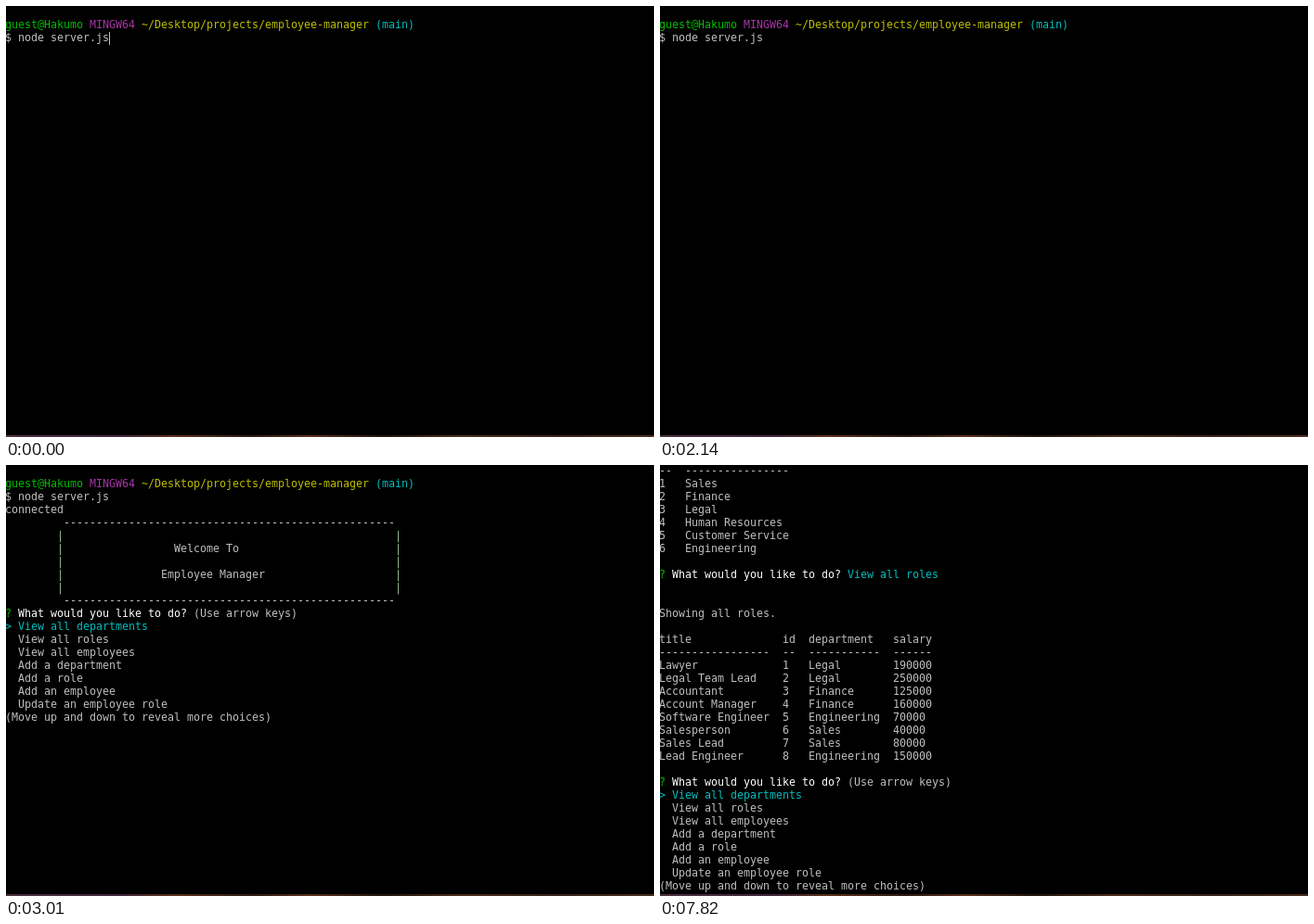
An HTML page that plays this animation: 698x465 px, repeating every 8000 ms.

```html
<!DOCTYPE html>
<html lang="en">
<head>
<meta charset="utf-8">
<title>Terminal session</title>
<style>
  html, body { margin: 0; width: 100%; height: 100%; overflow: hidden; background: #000; }
  #stage { position: relative; width: 698px; height: 465px; overflow: hidden; }
  #screen {
    position: absolute; left: -1px; top: -1px; margin: 0;
    font: 11.63px/14px "DejaVu Sans Mono", monospace;
    font-variant-ligatures: none;
    color: #bfbfbf;
  }
  .green { color: #00bf00; }
  .magenta { color: #a834a8; }
  .yellow { color: #bfbf00; }
  .cyan { color: #00bfbf; }
  .white { color: #fff; }
  .pipe { color: #90b890; }
  #cursor { position: absolute; left: 111px; top: 28px; width: 1px; height: 14px; background: #bfbfbf; }
  #edge {
    position: absolute; left: 0; bottom: 0; width: 100%; height: 2px;
    background: linear-gradient(90deg, #4a3040, #40263a 18%, #5c3018 26%, #2c1a14 38%,
      #5a3018 47%, #20140e 58%, #4c2c18 70%, #38221a 85%, #4a2c1c);
  }
</style>
</head>
<body>
<div id="stage">
  <pre id="screen"></pre>
  <div id="cursor"></div>
  <div id="edge"></div>
</div>
<script>
const LOOP = 8000;
const screenEl = document.getElementById('screen');
const cursorEl = document.getElementById('cursor');

const paint = (color, text) => `<span class="${color}">${text}</span>`;

const shell = [
  paint('green', 'guest@Hakumo') + ' ' + paint('magenta', 'MINGW64') + ' ' +
    paint('yellow', '~/Desktop/projects/employee-manager') + ' ' + paint('cyan', '(main)'),
  '$ node server.js',
];

const rule = ' '.repeat(9) + '-'.repeat(51);
const boxRow = (text = '', column = 0) => {
  const inner = (' '.repeat(column) + text).padEnd(51);
  return ' '.repeat(8) + paint('pipe', '|') + inner + paint('pipe', '|');
};
const banner = [
  'connected', rule,
  boxRow(), boxRow('Welcome To', 17), boxRow(), boxRow('Employee Manager', 15), boxRow(),
  rule,
];

const choices = [
  'View all departments', 'View all roles', 'View all employees', 'Add a department',
  'Add a role', 'Add an employee', 'Update an employee role',
];
const question = answer =>
  paint('green', '?') + ' ' + paint('white', 'What would you like to do?') + ' ' + answer;
const menu = (selected, hint = '(Use arrow keys)') => [
  question(hint),
  ...choices.map((c, i) => i === selected ? paint('cyan', '&gt; ' + c) : '  ' + c),
  '(Move up and down to reveal more choices)',
];

// Column widths follow the longest cell, with two spaces between columns.
function table(text) {
  const rows = text.split('\n').map(line => line.split(','));
  const widths = rows[0].map((_, i) => Math.max(...rows.map(r => r[i].length)));
  rows.splice(1, 0, widths.map(w => '-'.repeat(w)));
  return rows.map(r => r.map((cell, i) => cell.padEnd(widths[i])).join('  '));
}
const answered = (choice, noun, rows) => [
  question(paint('cyan', choices[choice])), '', '', `Showing all ${noun}.`, '', ...rows, '',
];

const departments = answered(0, 'departments', table(`id,dept_name
1,Sales
2,Finance
3,Legal
4,Human Resources
5,Customer Service
6,Engineering`));

const roles = answered(1, 'roles', table(`title,id,department,salary
Lawyer,1,Legal,190000
Legal Team Lead,2,Legal,250000
Accountant,3,Finance,125000
Account Manager,4,Finance,160000
Software Engineer,5,Engineering,70000
Salesperson,6,Sales,40000
Sales Lead,7,Sales,80000
Lead Engineer,8,Engineering,150000`));

const session = [...shell, ...banner];
const scenes = [
  [0, ['', ...shell]],
  [2940, ['', ...session]],
  [3010, ['', ...session, ...menu(0)]],
  [4750, [...session, ...departments, ...menu(0)]],
  [6880, [...session, ...departments, ...menu(1, '')]],
  [7820, [...session, ...departments, ...roles, ...menu(0)]],
];
const VISIBLE_ROWS = 33;
const cursorShown = [[0, 330], [600, 1130], [1680, 2140]];

let current;
function draw(now) {
  const t = now % LOOP;
  const scene = scenes.findLast(([start]) => t >= start);
  if (scene !== current) {
    current = scene;
    // A newline directly after <pre> is dropped by the parser only in markup, not in innerHTML of its children.
    screenEl.innerHTML = scene[1].slice(-VISIBLE_ROWS).map(row => row || ' ').join('\n');
  }
  cursorEl.hidden = !cursorShown.some(([on, off]) => t >= on && t < off);
  requestAnimationFrame(draw);
}
draw(performance.now());
</script>
</body>
</html>
```
